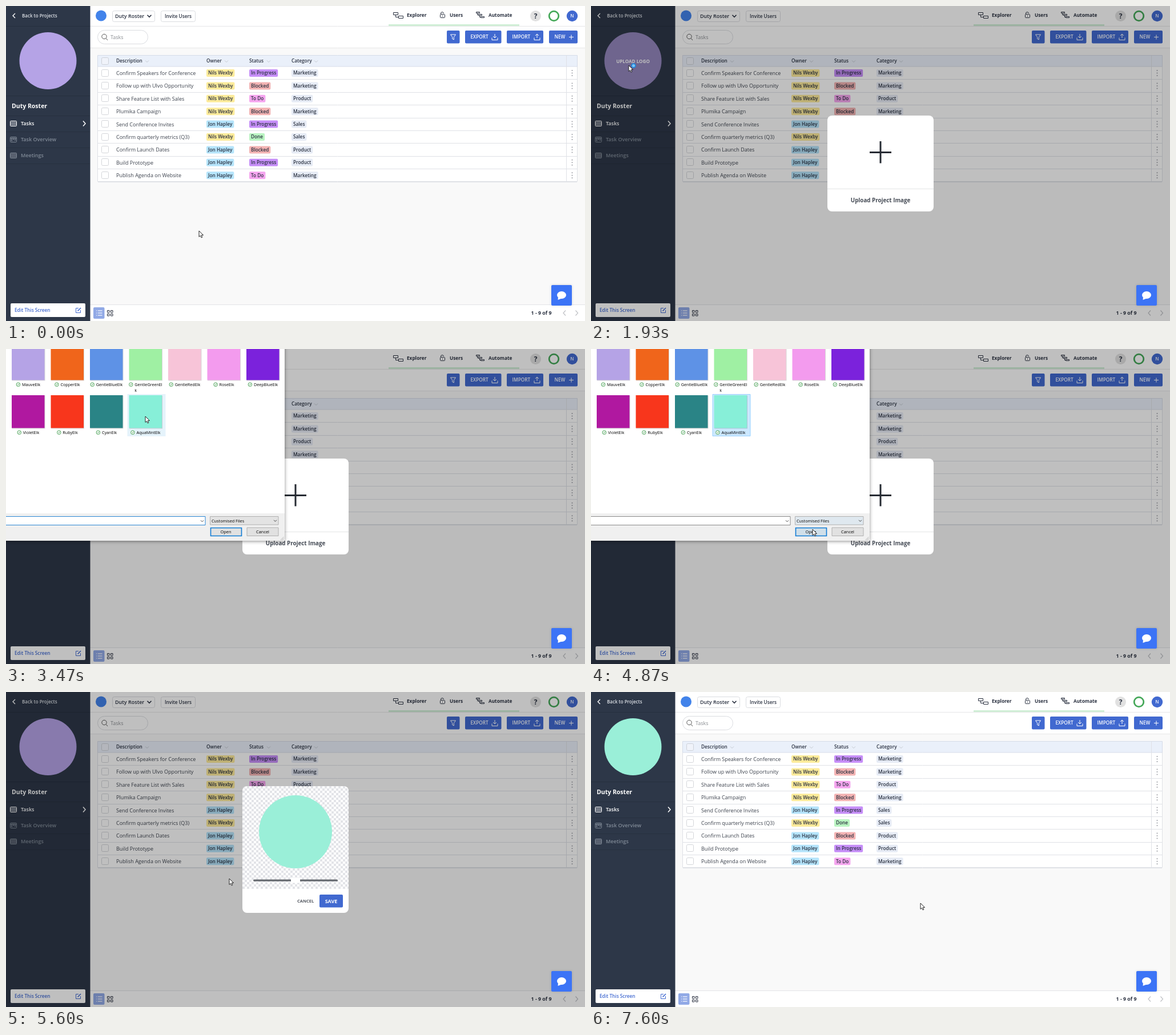
Recreate the animation shown at these times as an HTML page with a canvas. Size 1014 by 552 pixels, loop 9990 ms.

```html
<!DOCTYPE html>
<html lang="en">
<head>
<meta charset="utf-8">
<title>Project image upload</title>
<style>
  html, body { margin: 0; width: 100%; height: 100%; overflow: hidden; background: #f9f9f9; }
  canvas { display: block; }
</style>
</head>
<body>
<canvas id="stage" width="1014" height="552"></canvas>
<script>
const W = 1014, H = 552, LOOP = 9990, TICKS = 150;
const screenCtx = document.getElementById('stage').getContext('2d');
const layer = Object.assign(document.createElement('canvas'), { width: W, height: H });
const layerCtx = layer.getContext('2d');
let g = screenCtx;

const BLUE = '#4169d0', INK = '#2a3140', LILAC = '#b5a3e6', MINT = '#9aefd8';
const PROJECT = 'Duty Roster';
const OWNERS = { n: ['Nils Wexby', '#fdeb9a'], t: ['Jon Hapley', '#b5e4fb'] };
const STATUS = {
  p: ['In Progress', '#c68ef8'], b: ['Blocked', '#f3b3b3'],
  t: ['To Do', '#f5a5ef'], d: ['Done', '#b9f4c1']
};
const TASKS = [
  ['Confirm Speakers for Conference', 'n', 'p', 'Marketing'],
  ['Follow up with Ulvo Opportunity', 'n', 'b', 'Marketing'],
  ['Share Feature List with Sales', 'n', 't', 'Product'],
  ['Plumika Campaign', 'n', 'b', 'Marketing'],
  ['Send Conference Invites', 't', 'p', 'Sales'],
  ['Confirm quarterly metrics (Q3)', 'n', 'd', 'Sales'],
  ['Confirm Launch Dates', 't', 'b', 'Product'],
  ['Build Prototype', 't', 'p', 'Product'],
  ['Publish Agenda on Website', 't', 't', 'Marketing']
];
const FILES = [
  ['MauveElk', LILAC], ['CopperElk', '#f0651b'], ['GentleBlueElk', '#5e92e6'],
  ['GentleGreenEl', '#9ff0a3', 'k'], ['GentleRedElk', '#f7c4d8'], ['RoseElk', '#f39bee'],
  ['DeepBlueElk', '#7b22dc'], ['VioletElk', '#b018a0'], ['RubyElk', '#f8361c'],
  ['CyanElk', '#2a8486'], ['AquaMintElk', '#87efd8']
];

// Pointer moves: start tick, end tick, end point, optional control point
const START = [338, 394];
const MOVES = [
  [5, 20, [61, 116]], [20, 24, [66, 104]], [43, 52, [244, 118]],
  [60, 73, [388, 316]], [75, 80, [391, 327]], [93, 106, [577, 370], [480, 292]]
];

const clamp = v => Math.max(0, Math.min(1, v));
const smooth = p => p * p * (3 - 2 * p);

function pointerAt(n) {
  let pos = START;
  for (const [from, to, end, ctrl] of MOVES) {
    if (n <= from) break;
    const p = smooth(clamp((n - from) / (to - from)));
    const mid = ctrl || [(pos[0] + end[0]) / 2, (pos[1] + end[1]) / 2];
    pos = pos.map((v, i) => v * (1 - p) ** 2 + 2 * mid[i] * p * (1 - p) + end[i] * p * p);
  }
  return pos;
}

function rect(x, y, w, h, fill, stroke, r = 0, lw = 1) {
  g.beginPath();
  g.roundRect(x, y, w, h, r);
  if (fill) { g.fillStyle = fill; g.fill(); }
  if (stroke) { g.strokeStyle = stroke; g.lineWidth = lw; g.stroke(); }
}
function circle(x, y, r, fill, stroke, lw = 1) {
  g.beginPath();
  g.arc(x, y, r, 0, 7);
  if (fill) { g.fillStyle = fill; g.fill(); }
  if (stroke) { g.strokeStyle = stroke; g.lineWidth = lw; g.stroke(); }
}
function line(color, lw, ...pts) {
  g.beginPath();
  for (let i = 0; i < pts.length; i += 2) g.lineTo(pts[i], pts[i + 1]);
  g.strokeStyle = color;
  g.lineWidth = lw;
  g.stroke();
}
// y is the middle of the capital letters
function text(s, x, y, size, color, weight = 400, align = 'left') {
  g.font = `${weight} ${size}px "Open Sans", "Noto Sans", sans-serif`;
  g.textAlign = align;
  g.fillStyle = color;
  g.fillText(s, x, y + size * 0.36);
}
function chevron(x, y, dx, dy, color, lw = 1) {
  if (dx) line(color, lw, x - dx / 2, y - dy, x + dx / 2, y, x - dx / 2, y + dy);
  else line(color, lw, x - dy, y - dy / 2, x, y + dy / 2, x + dy, y - dy / 2);
}
function tag(s, x, y, color) {
  g.font = '600 8.25px "Open Sans", "Noto Sans", sans-serif';
  rect(x, y - 6.5, g.measureText(s).width + 6, 13, color, null, 2);
  text(s, x + 3, y, 8.25, INK, 600);
}

function drawSidebar(color, hover) {
  rect(0, 0, 147.5, H, '#2d3748');
  for (const y of [35.5, 157.5]) line('#252f3e', 1, 0, y, 147, y);
  for (const y of [192.5, 220.5, 248.5, 276.5]) line('rgba(0,0,0,.13)', 1, 0, y, 147, y);
  chevron(14, 17, -4, 4, '#fff', 1.4);
  text('Back to Projects', 28, 17.5, 8, '#dfe3e8', 600);
  circle(73.5, 96, 50, color);
  if (hover) {
    circle(73.5, 96, 50, 'rgba(0,0,0,.18)');
    text('UPLOAD LOGO', 73.5, 97, 8.1, '#fff', 700, 'center');
  }
  text(PROJECT, 10, 175, 10.5, '#fff', 700);
  [['Tasks', 206], ['Task Overview', 234], ['Meetings', 262]].forEach(([name, y], i) => {
    const c = i ? '#808a97' : '#fff';
    rect(7.5, y - 4.5, 11, 9, i === 1 ? null : 'rgba(255,255,255,.15)', c, 1);
    if (i === 1) {
      line(c, 1, 7, y - 2.5, 19, y - 2.5);
      for (const [x, h] of [[10, 5], [13, 3], [16, 4]]) line(c, 1.5, x, y - 2, x, y - 2 + h);
    } else {
      for (const dy of [-2, 0, 2]) line(c, 0.5, 8, y + dy, 18, y + dy);
    }
    text(name, 26, y, 9, c, 600);
  });
  chevron(137, 206, 4, 4.5, '#fff', 1.5);

  rect(8, 521, 131, 24, '#fff', null, 2);
  text('Edit This Screen', 15, 533, 8.25, BLUE, 600);
  line(BLUE, 1, 127, 529.5, 122.5, 529.5, 122.5, 537.5, 130.5, 537.5, 130.5, 533);
  line(BLUE, 1.6, 125.5, 534.5, 131, 529);
}

function drawTopBar() {
  rect(147, 0, W - 147, 73, '#fff');
  for (const y of [35.5, 73.5]) line('#e6e6e8', 1, 147, y, W, y);
  circle(166.5, 17, 9.5, '#4283ea');
  rect(186.5, 8.5, 74, 19, '#fff', '#dadce0', 3);
  text(PROJECT, 191, 17.5, 9, INK, 600);
  chevron(251, 17.5, 0, 3.5, INK, 1.6);
  rect(271.5, 8.5, 60, 19, '#fff', '#dadce0', 3);
  text('Invite Users', 301.5, 18, 8.25, INK, 600, 'center');

  rect(670, 32, 229, 3, '#d0efd6');
  rect(678.5, 11.5, 8, 4, null, INK);
  line(INK, 1, 682.5, 16, 682.5, 19.5, 687, 19.5);
  rect(687.5, 17.5, 8, 4, null, INK);
  text('Explorer', 702, 16.5, 8.25, INK, 700);
  rect(760.5, 14.5, 8, 6, null, INK, 1);
  g.beginPath();
  g.arc(764, 13, 2.4, Math.PI, 0);
  g.stroke();
  line(INK, 1, 761.6, 12.5, 761.6, 14.5);
  circle(764.5, 17.5, 0.8, INK);
  text('Users', 777, 16.5, 8.25, INK, 700);
  for (const [x, y] of [[823.5, 10.5], [827.5, 14.5], [831.5, 18.5]]) rect(x, y, 6, 2, null, INK);
  line(INK, 1, 825.5, 13, 825.5, 15.5, 827, 15.5);
  line(INK, 1, 829.5, 17, 829.5, 19.5, 831, 19.5);
  text('Automate', 845, 16.5, 8.25, INK, 700);
  circle(927.5, 17.5, 9.5, '#e1e1e1');
  text('?', 927.5, 17.5, 12, INK, 700, 'center');
  circle(959.5, 17.5, 8.3, null, '#45a859', 2.8);
  circle(991.5, 17.5, 9.7, BLUE);
  text('N', 991.5, 17.5, 8, '#fff', 600, 'center');

  rect(160.5, 42.5, 88, 24, '#fff', '#dadce0', 12);
  circle(172, 53.5, 4.2, null, '#555', 1);
  line('#555', 1, 175, 56.5, 178, 60);
  text('Tasks', 183, 54.5, 9, '#8a8d92');

  for (const [x, w, name] of [[772, 22.5, ''], [804, 63.5, 'EXPORT'], [877, 64, 'IMPORT'], [951, 50, 'NEW']]) {
    rect(x, 43, w, 22.5, BLUE, null, 2);
    text(name, x + 9.5, 54.3, 8.25, '#fff', 600);
  }
  line('#fff', 1, 778.5, 50, 787.5, 50, 784.3, 54.5, 784.3, 59, 781.7, 57.5, 781.7, 54.5, 778.5, 50);
  for (const [x, tip, tail] of [[856, 56, 49], [930, 49, 56]]) {
    const back = tip > tail ? -3 : 3;
    line('#fff', 1, x - 5, 55.5, x - 5, 59.5, x + 5, 59.5, x + 5, 55.5);
    line('#fff', 1, x, tail, x, tip);
    line('#fff', 1, x - 3, tip + back, x, tip, x + 3, tip + back);
  }
  line('#fff', 1, 986, 54.5, 994, 54.5);
  line('#fff', 1, 990, 50.5, 990, 58.5);
}

function drawTable() {
  const rowH = 22.4;
  rect(160.5, 87, 840, 220.5, '#fff', '#dfe1e6');
  rect(160.5, 86.5, 840, 19.5, '#eaf0fa', '#d6dce8');
  rect(167.5, 90.5, 12, 12, '#f0f3fa', '#cdd1d8', 2);
  for (const [name, x, arrow] of [['Description', 193, 247], ['Owner', 351, 386], ['Status', 426, 460], ['Category', 500, 543]]) {
    text(name, x, 96.5, 8.25, INK, 600);
    chevron(arrow, 97, 0, 3, '#c3c8d1');
  }
  TASKS.forEach(([name, owner, status, category], i) => {
    const y = 117.5 + rowH * i, edge = Math.round(106 + rowH * (i + 1)) + 0.5;
    line('#dfe1e6', 1, 161, edge, 1000, edge);
    rect(167.5, Math.round(y) - 6.5, 12, 12, '#fff', '#d3d5d9', 2);
    text(name, 193, y + 0.3, 9, '#3c424d');
    tag(OWNERS[owner][0], 351, y, OWNERS[owner][1]);
    tag(STATUS[status][0], 426, y, STATUS[status][1]);
    tag(category, 500, y, '#e6ebf5');
    for (const dy of [-4.5, 0, 4.5]) circle(991.5, y + dy, 1, '#9a9da3');
  });
  line('#dfe1e6', 1, 981.5, 87, 981.5, 307);
}

function drawFooter() {
  rect(147, 523, W - 147, 29, '#fff');
  line('#e3e4e7', 1, 147, 523.5, W, 523.5);
  rect(153, 528, 19.5, 20, '#91a9e6', null, 2);
  for (const y of [534, 538, 542]) {
    line('#fff', 1.2, 158, y, 159.5, y);
    line('#fff', 1.2, 161, y, 168.5, y);
  }
  for (const x of [177.5, 183.5]) for (const y of [533.5, 539.5]) rect(x, y, 3.5, 3.5, null, INK);
  text('1 - 9 of 9', 955.5, 538, 8.8, INK, 700, 'right');
  chevron(978, 538, -4, 4.5, '#bfc1c5', 1.2);
  chevron(999.5, 538, 4, 4.5, '#bfc1c5', 1.2);
}

function drawChat() {
  g.save();
  g.shadowColor = 'rgba(0,0,0,.15)';
  g.shadowBlur = 4;
  rect(955, 489, 36, 36, '#3c74f6', null, 2);
  g.restore();
  g.fillStyle = '#fff';
  g.beginPath();
  g.ellipse(973, 506.5, 8, 6.4, 0, 0, 7);
  g.fill();
  g.beginPath();
  g.moveTo(967, 510);
  g.lineTo(966.5, 515);
  g.lineTo(973, 512.5);
  g.fill();
}

function drawUploadModal() {
  rect(414, 192, 186, 168, '#fff', null, 8);
  line('#e3e4e6', 1, 414, 320.5, 600, 320.5);
  line('#262b33', 3, 488, 256.5, 526, 256.5);
  line('#262b33', 3, 507, 237, 507, 275.5);
  text('Upload Project Image', 507, 340.5, 9.8, '#454b55', 700, 'center');
}

function drawCropModal([px, py]) {
  g.save();
  rect(414, 165, 186, 222, '#fff', null, 8);
  g.clip();
  g.fillStyle = '#e3e4e8';
  for (let row = 0; row < 45; row++)
    for (let x = 414 + (row % 2) * 4; x < 600; x += 8) g.fillRect(x, 165 + row * 4, 4, 4);
  g.restore();
  circle(507, 245, 64, MINT);
  rect(433, 328.5, 148, 3.2, '#666a70', null, 1.6);
  rect(499, 325.5, 16, 9, '#fff', null, 2);
  text('CANCEL', 510, 366.5, 7.5, '#555a62', 700);
  const over = px > 549 && px < 590 && py > 355 && py < 377;
  rect(549, 355, 41, 22.5, over ? '#3657b8' : BLUE, null, 2);
  text('SAVE', 569.5, 366.5, 9, '#fff', 700, 'center');
}

function drawFile([name, color, rest], i, n, [px, py]) {
  const col = i % 7, row = Math.floor(i / 7);
  const x = 10 + 68.5 * col, y = row ? 81 : -3, cellX = x - 3;
  const over = px >= cellX && px < cellX + 68 && py > y - 2 && py < y + 72;
  if (i === 10 && n >= 58) rect(cellX + 0.5, y - 1.5, 66, 73, '#cce8ff', '#99d1ff');
  else if (over) rect(cellX, y - 2, 67, 74, '#e5f3fb');
  rect(x + 0.5, y + 0.5, 58, 58, 'rgba(0,0,0,.16)');
  rect(x, y, 57.5, 57.5, color);

  g.font = '400 7.2px "Open Sans", "Noto Sans", sans-serif';
  const left = x + 29 - (g.measureText(name).width + 10) / 2, mid = y + 65.3;
  circle(left + 3.5, mid, 3.3, '#fff', '#3a9a48', 0.9);
  line('#3a9a48', 0.9, left + 2, mid, left + 3.2, mid + 1.2, left + 5.2, mid - 1.3);
  text(name, left + 10, mid + 0.3, 7.2, '#000');
  if (rest) text(rest, left + 10, mid + 10, 7.2, '#000');
}

function drawDialog(n, pointer, shown, scale) {
  const [px, py] = pointer;
  layerCtx.clearRect(0, 0, W, H);
  g = layerCtx;
  g.save();
  g.translate(115, 110);
  g.scale(scale, scale);
  g.translate(-115, -110);
  g.save();
  g.shadowColor = 'rgba(0,0,0,.45)';
  g.shadowBlur = 6;
  g.shadowOffsetY = 1;
  rect(-300, -200, 788, 536, '#fff');
  g.restore();
  rect(-300, 288, 788, 48, '#f0f0f0');
  FILES.forEach((file, i) => drawFile(file, i, n, pointer));

  rect(-300, 293.5, 649, 15, '#fff', n < 64 ? '#2b86d3' : '#8a8a8a');
  chevron(343.5, 301.5, 0, 2.5, '#444');
  const comboOver = py > 280 && py < 318 && px > 357;
  rect(357.5, 293.5, 119.5, 14.5, comboOver ? '#dfe8ef' : '#e3e3e3', '#b0b0b0');
  text('Customised Files', 360, 301, 7.3, '#000');
  chevron(471.5, 301, 0, 2.5, '#444');
  const openOver = px > 358 && px < 413 && py > 312 && py < 328;
  rect(358.5, 313.5, 54, 14, openOver ? '#d0dfe9' : '#e1e1e1', '#0f7bd4', 0, 1.6);
  text('Open', 385, 320.5, 7.4, '#000', 400, 'center');
  rect(422, 313, 55, 14.5, '#e1e1e1', '#b0b0b0');
  text('Cancel', 449.5, 320.5, 7.4, '#000', 400, 'center');
  for (const d of [2, 4, 6]) line('#b5b5b5', 0.8, 486.5 - d, 335, 486.5, 335 - d);
  g.restore();
  g = screenCtx;
  g.globalAlpha = shown;
  g.drawImage(layer, 0, 0);
  g.globalAlpha = 1;
}

function drawPointer([x, y], busy) {
  g.save();
  g.translate(x, y);
  if (busy) circle(8.5, 0.5, 3.4, '#7fc4f2', '#1f86dc', 1.8);
  g.beginPath();
  for (const [dx, dy] of [[0, 0], [0, 10.5], [2.4, 8.4], [4.1, 12], [5.8, 11.2], [4.2, 7.7], [7.5, 7.5]]) g.lineTo(dx, dy);
  g.closePath();
  g.fillStyle = '#fff';
  g.fill();
  g.strokeStyle = '#111';
  g.lineWidth = 0.9;
  g.stroke();
  g.restore();
}

function draw(n) {
  const pointer = pointerAt(n);
  const modal = n >= 28 && n < 114;
  const fade = n === 28 ? 0.5 : 1;
  const inCircle = Math.hypot(pointer[0] - 73.5, pointer[1] - 96) < 50;

  rect(0, 0, W, H, '#f9f9f9');
  drawTopBar();
  drawTable();
  drawFooter();
  drawSidebar(n < 114 ? LILAC : MINT, inCircle && n < 31);
  if (modal) rect(0, 0, W, H, `rgba(0,0,0,${0.25 * fade})`);
  drawChat();
  if (modal) {
    g.globalAlpha = fade;
    if (n < 81) drawUploadModal();
    else drawCropModal(pointer);
    g.globalAlpha = 1;
  }
  if (n >= 32 && n < 79) {
    const opened = 1 - (1 - clamp((n - 31.35) / 4.65)) ** 3;
    const shown = n < 76 ? opened : 1 - (n - 75) / 4;
    drawDialog(n, pointer, shown, 0.94 + 0.06 * shown);
  }
  drawPointer(pointer, n >= 28 && n < 31);
}

const origin = performance.now();
let lastTick = -1;
function frame() {
  const ms = (performance.now() - origin) % LOOP;
  const n = Math.min(TICKS - 1, Math.floor((ms + 4) * TICKS / LOOP));
  if (n !== lastTick) draw(lastTick = n);
  requestAnimationFrame(frame);
}
frame();
</script>
</body>
</html>
```
